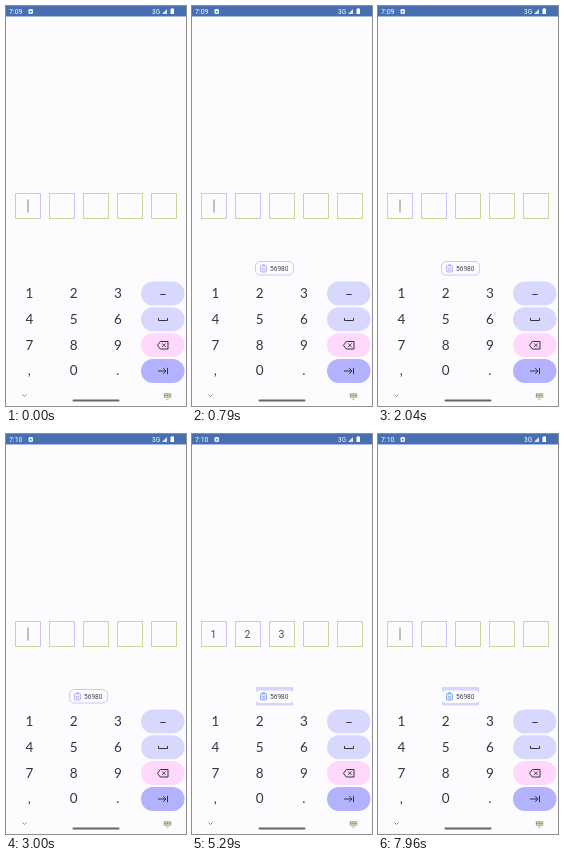
An HTML page with a canvas that plays this animation: 180 px wide and 400 px high, repeating every 8 s.

```html
<!DOCTYPE html>
<html>
<head>
<meta charset="utf-8">
<style>
html, body { margin: 0; width: 100%; height: 100%; overflow: hidden; background: #fcfcff; }
canvas { display: block; width: 180px; height: 400px; }
</style>
</head>
<body>
<canvas id="stage"></canvas>
<script>
const LOOP = 8000;
const canvas = document.getElementById('stage');
const ratio = window.devicePixelRatio || 1;
canvas.width = 180 * ratio;
canvas.height = 400 * ratio;
const c = canvas.getContext('2d');

const BG = '#fcfcff', INK = '#35353b', OLIVE = '#d3d399', LILAC = '#c6c4f8';

// Times at which the number of filled boxes changes
const ENTRY = [[0, 0], [3340, 1], [3600, 2], [3860, 3], [4120, 4],
  [4560, 5], [5040, 4], [5190, 3], [5340, 2], [5490, 1], [5620, 0]];

// Border colours of each box: top, right, bottom, left
const SIDES = ['olol', 'lloo', 'lool', 'ooll', 'oool'].map(s => [...s]);
SIDES[0] = ['o', 'l', 'o', 'o'];
SIDES[1] = ['l', 'l', 'o', 'l'];
SIDES[3] = ['o', 'o', 'o', 'o'];
SIDES[4] = ['o', 'o', 'o', 'l'];

function rect(x, y, w, h, color) {
  c.fillStyle = color;
  c.fillRect(x, y, w, h);
}

function pill(x, y, w, h, r, fill, stroke) {
  c.beginPath();
  c.roundRect(x, y, w, h, r);
  if (fill) { c.fillStyle = fill; c.fill(); }
  if (stroke) { c.strokeStyle = stroke; c.lineWidth = 1; c.stroke(); }
}

function line(points, color = INK, width = 1, close = false) {
  c.beginPath();
  points.forEach(([x, y], i) => i ? c.lineTo(x, y) : c.moveTo(x, y));
  if (close) c.closePath();
  c.strokeStyle = color;
  c.lineWidth = width;
  c.stroke();
}

function text(s, x, y, size, color = INK, align = 'center', family = 'Lato') {
  c.font = `${size}px ${family}, sans-serif`;
  c.fillStyle = color;
  c.textAlign = align;
  c.textBaseline = 'alphabetic';
  c.fillText(s, x, y);
}

function statusBar(t) {
  rect(0, 0, 180, 10, '#476fb1');
  rect(0, 10, 180, 1, '#a9bcda');
  text(t < 2540 ? '7:09' : '7:10', 3, 8, 7, '#fff', 'left', 'Roboto');
  pill(22.5, 3, 4.5, 5, 1.2, '#e8eefa');
  rect(24, 5, 1.5, 1.5, '#476fb1');
  text('3G', 146, 8, 6.5, '#fff', 'left', 'Roboto');
  c.beginPath();
  c.moveTo(156, 8);
  c.lineTo(161, 8);
  c.lineTo(161, 3);
  c.fillStyle = '#dce5f5';
  c.fill();
  rect(164.5, 3, 3.5, 5, '#fff');
  rect(165.3, 2.2, 2, 1, '#fff');
}

function boxes(t) {
  const filled = ENTRY.filter(e => t >= e[0]).pop()[1];
  const focus = Math.min(filled, 4);
  SIDES.forEach((side, i) => {
    const x = 9 + 34 * i, y = 187;
    const hue = n => side[n] === 'o' ? OLIVE : LILAC;
    rect(x, y, 26, 1, hue(0));
    rect(x, y + 25, 26, 1, hue(2));
    rect(x, y, 1, 26, hue(3));
    rect(x + 25, y, 1, 26, hue(1));
    if (i < filled) text(i + 1, x + 12.5, 203.6, 10.5, '#4c4c50', 'center', 'Roboto');
  });
  const blinkOn = (t + 250) % 1000 < 500;
  if (blinkOn && filled < 5) {
    const x = 21.5 + 34 * focus;
    rect(x, 193.5, 1, 13, focus === 4 ? '#7774b5' : '#85836c');
  }
  return focus;
}

function chip(t) {
  const shown = Math.min(1, Math.max(0, (t - 350) / 180));
  if (!shown) return;
  c.globalAlpha = shown;
  const lit = t >= 3380;
  if (lit) {
    rect(64, 253, 37, 18.5, '#d6d5fd');
    pill(63, 256.5, 39, 12.5, 5, BG);
  } else {
    pill(63.5, 255.5, 38, 13.5, 4.5, BG, '#cbc9f5');
  }
  const tone = lit ? '#8eaee8' : '#b9b8ee';
  pill(68.5, 259.5, 6, 6.5, 1, lit ? '#dce7fc' : '#ececff', tone);
  rect(70, 258.3, 3, 2, tone);
  line([[70, 262.5], [73, 262.5]], tone, 0.8);
  line([[70, 264.3], [73, 264.3]], tone, 0.8);
  text('56980', 78, 264.8, 6.6, '#44444b', 'left', 'Roboto');
  c.globalAlpha = 1;
}

function keyboard(last) {
  ['123', '456', '789', ',0.'].forEach((row, r) =>
    [...row].forEach((k, i) => text(k, 23.3 + 44.3 * i, 292 + 25.8 * r, 13.5)));

  ['#d8d8ff', '#d8d8ff', '#ffd8fc', '#b2b2ff'].forEach((fill, i) =>
    pill(135, 275.5 + 25.8 * i, 43.5, 24, 12, fill));

  line([[154.3, 288.5], [159.7, 288.5]]);
  line([[152.5, 312], [152.5, 314.5], [161.5, 314.5], [161.5, 312]]);

  line([[151.5, 339.3], [154.3, 335.5], [162, 335.5], [162, 343], [154.3, 343]], INK, 1, true);
  line([[156, 337.4], [159.7, 341.1]], INK, 0.9);
  line([[159.7, 337.4], [156, 341.1]], INK, 0.9);

  if (last) {
    line([[153, 365], [155.6, 367.5], [161, 362]]);
  } else {
    line([[152, 365], [160, 365]]);
    line([[157.2, 362.2], [160, 365], [157.2, 367.8]]);
    line([[161.5, 361.8], [161.5, 368.2]]);
  }
}

function navigation() {
  line([[16.5, 388.5], [18.5, 390.5], [20.5, 388.5]], '#8c8c8c', 1);
  pill(66.5, 393.5, 47, 2, 1, '#6c675c');
  pill(157.5, 387, 7.5, 4.5, 0.5, '#d9d8c0');
  for (let y = 387.5; y < 391; y += 1.6)
    for (let x = 158; x < 164.5; x += 1.6) rect(x, y, 0.9, 0.9, '#77775f');
  line([[159.8, 392.5], [161.3, 393.7], [162.8, 392.5]], '#99997f', 0.8);
}

function draw(t) {
  c.setTransform(ratio, 0, 0, ratio, 0, 0);
  rect(0, 0, 180, 400, BG);
  statusBar(t);
  const focus = boxes(t);
  chip(t);
  keyboard(focus === 4);
  navigation();
}

const start = performance.now();
function tick() {
  draw((performance.now() - start) % LOOP);
  requestAnimationFrame(tick);
}
tick();
</script>
</body>
</html>
```
